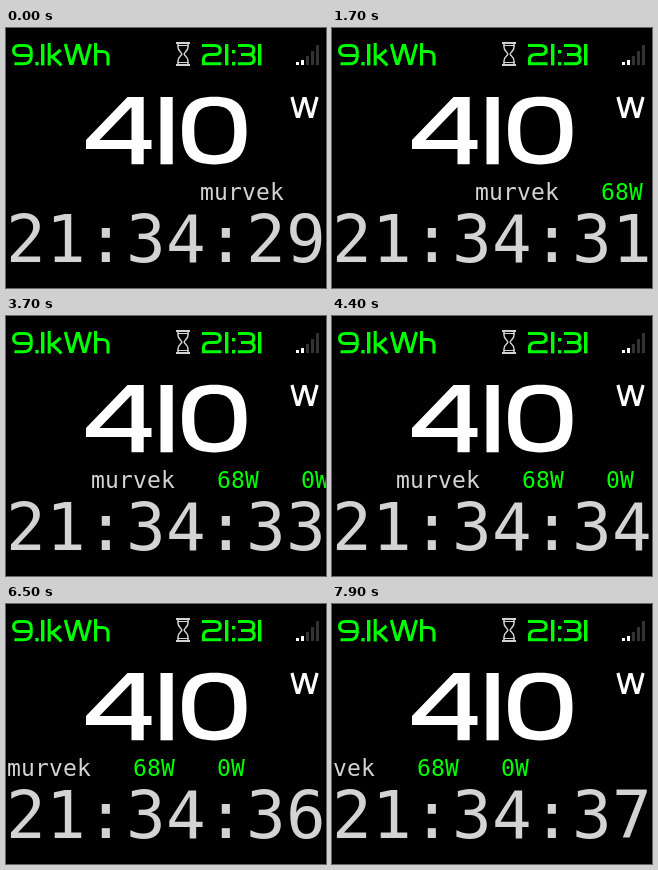
Recreate the animation shown at these times as an HTML page with a canvas. Size 320 by 260 pixels, loop 8 s.

```html
<!DOCTYPE html>
<html lang="en">
<head>
<meta charset="utf-8">
<title>Power meter</title>
<style>
  html, body { margin: 0; width: 100%; height: 100%; overflow: hidden; background: #000; }
  canvas { display: block; }
</style>
</head>
<body>
<canvas id="stage" width="320" height="260"></canvas>
<script>
const ctx = document.getElementById('stage').getContext('2d');
const LOOP = 8000, GREEN = '#0f0', GREY = '#d3d3d3';

function fill(path, color) {
  ctx.fillStyle = color;
  ctx.fill(new Path2D(path), 'evenodd');
}

function stroke(path, color, width) {
  ctx.strokeStyle = color;
  ctx.lineWidth = width;
  ctx.stroke(new Path2D(path));
}

function box(x, y, w, h, color) {
  ctx.fillStyle = color;
  ctx.fillRect(x, y, w, h);
}

// Squarish oval; k near 1 gives tighter corners
function oval(cx, cy, rx, ry, k) {
  const a = rx * k, b = ry * k, l = cx - rx, r = cx + rx, t = cy - ry, d = cy + ry;
  return `M${cx} ${t}C${cx + a} ${t} ${r} ${cy - b} ${r} ${cy}` +
    `S${cx + a} ${d} ${cx} ${d}S${l} ${cy + b} ${l} ${cy}S${cx - a} ${t} ${cx} ${t}Z`;
}

function wide(x, y) {
  return `M${x + 1.6} ${y}l5.3 19.4h1.6l5 -17.8h1.4l5 17.8h1.6l5.3 -19.4`;
}

function mono(text, x, y, size, step, color) {
  ctx.font = `${size}px "DejaVu Sans Mono", monospace`;
  ctx.fillStyle = color;
  [...text].forEach((c, i) => ctx.fillText(c, x + i * step, y));
}

function drawEnergy() {
  stroke('M25.2 27.5H13Q7.6 27.5 7.6 22.6Q7.6 17.5 13 17.5H18.5Q25.2 17.5 25.2 23.5V28.5Q25.2 35.8 17.5 35.8H8.5', GREEN, 3.1);
  box(29.3, 34, 3.4, 3.4, GREEN);
  box(35, 16, 3.4, 21.4, GREEN);
  stroke('M43.2 15V37.4M54.5 22L46.5 28.8L55.5 37.4M43.2 28.8H47', GREEN, 3.1);
  stroke(wide(57.7, 16), GREEN, 3.1);
  stroke('M89.6 15V37.4M89.6 23.5H96.5Q102 23.5 102 29V37.4', GREEN, 3.1);
}

function drawTime() {
  stroke('M196 17.5H208.5Q214.2 17.5 214.2 22Q214.2 26.5 208.5 26.5H203.5Q197.5 26.5 197.5 32V35.8H215.5', GREEN, 3.1);
  box(219, 16, 3.4, 21.4, GREEN);
  box(226, 22, 3.4, 3.4, GREEN);
  box(226, 34, 3.4, 3.4, GREEN);
  stroke('M232 17.5H242.5Q247.8 17.5 247.8 22Q247.8 26.5 242.5 26.5H235M242.5 26.5Q248.2 26.5 248.2 31.2Q248.2 35.8 242.5 35.8H232', GREEN, 3.1);
  box(252, 16, 3.4, 21.4, GREEN);
}

function drawIcons() {
  stroke('M170 15H184M170 37H184', GREY, 2);
  stroke('M171.5 17.5H182.5M171.5 34.5H182.5', GREY, 1);
  stroke('M172 15V19C172 23.5 175.8 24 175.8 26S172 28.5 172 33V37' +
    'M182 15V19C182 23.5 178.2 24 178.2 26S182 28.5 182 33V37', GREY, 1.5);
  [3, 5, 9, 14, 20].forEach((h, i) =>
    box(290 + 5 * i, 37 - h, 3, h, i < 2 ? '#fff' : '#333'));
}

function drawPower() {
  fill('M80 112L121.5 69H137.7V112H145.5V121H137.7V136.3H125.5V121H80ZM125.5 112V79L93.5 112Z', '#fff');
  box(154.5, 69, 12.2, 67.3, '#fff');
  fill(oval(208.3, 102.6, 32.2, 33.8, .73) + oval(208.3, 102.6, 20, 24.6, .73), '#fff');
  stroke(wide(284.3, 69), '#fff', 3.2);
}

// The ticker moves 3px per tick, with one short stall and catch-up
function scrolled(tick) {
  return tick < 26 ? Math.min(3 * tick, 72) : Math.max(79, 3 * tick - 2);
}

function draw(now) {
  const t = now % LOOP;
  box(0, 0, 320, 260, '#000');
  drawEnergy();
  drawTime();
  drawIcons();
  drawPower();

  const x = 194 - scrolled(Math.floor(t / 100));
  mono('murvek', x, 172, 23, 14, GREY);
  mono('68W', x + 126, 172, 23, 14, GREEN);
  mono('0W', x + 210, 172, 23, 14, GREEN);

  const seconds = 29 + Math.floor((t + 600) / 1000);
  mono('21:34:' + seconds, 0, 234, 66, 40, GREY);
  requestAnimationFrame(draw);
}

requestAnimationFrame(draw);
</script>
</body>
</html>
```
